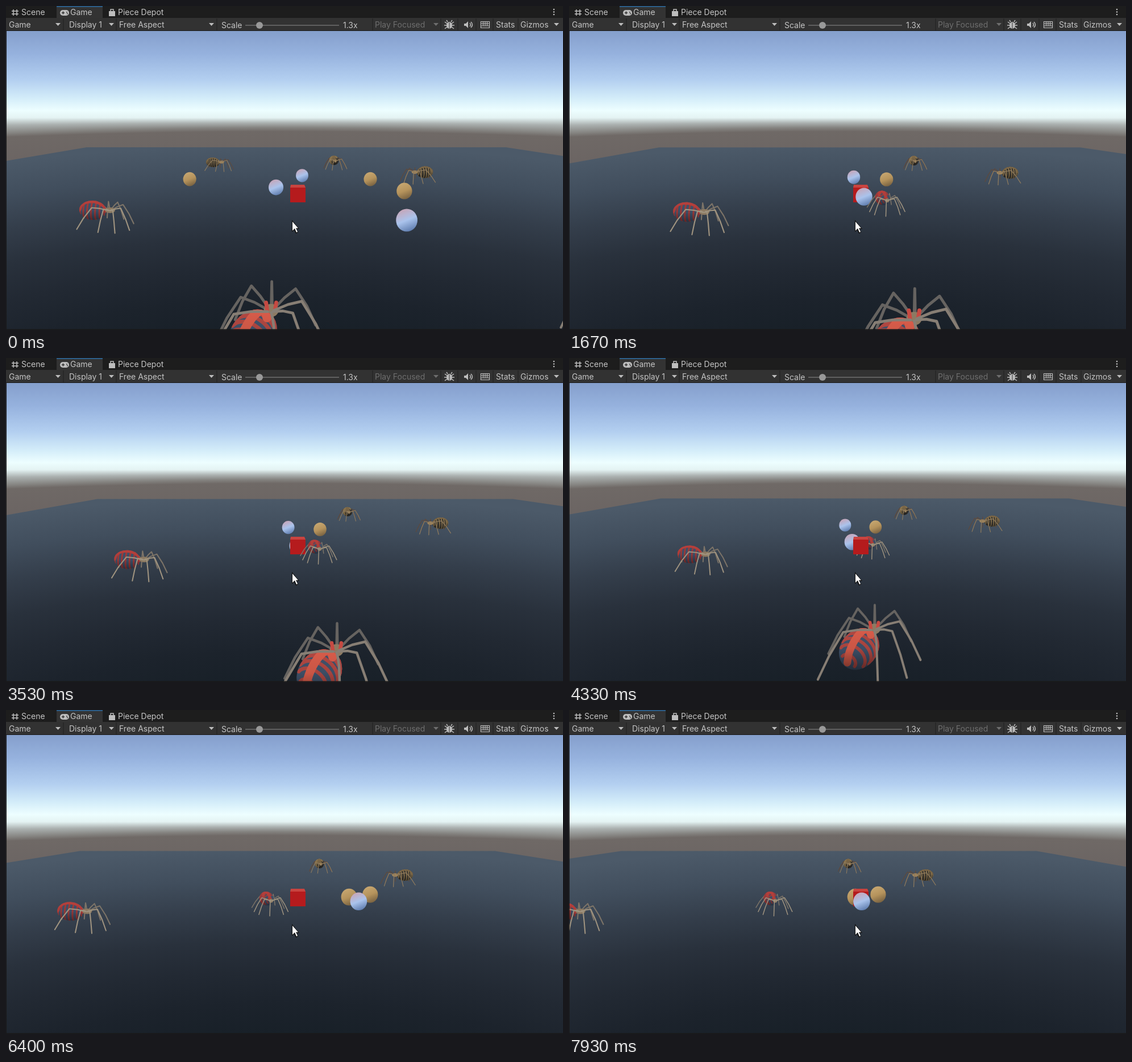
An HTML page with a canvas that plays this animation: 980 px wide and 571 px high, repeating every 8 s.

```html
<!DOCTYPE html>
<html lang="en">
<head>
<meta charset="utf-8">
<title>Spider arena</title>
<style>
  html, body { margin: 0; width: 100%; height: 100%; overflow: hidden; background: #191919; }
  canvas, svg { position: absolute; left: 0; top: 0; display: block; }
  text { font: 14px Inter, Roboto, sans-serif; fill: #c4c4c4; }
  .icon { fill: none; stroke: #bdbdbd; stroke-width: 1.5; }
  .solid { fill: #bdbdbd; }
  .dim { fill: #6e6e6e; }
</style>
</head>
<body>
<canvas id="view" width="980" height="571"></canvas>
<svg width="980" height="44" viewBox="0 0 980 44">
  <rect width="980" height="22" fill="#1d1d1d"/>
  <rect x="89" width="81" height="22" fill="#333"/>
  <rect x="89" width="81" height="2" fill="#2c5d87"/>
  <rect y="21" width="980" height="22" fill="#323232"/>
  <rect y="43" width="980" height="1" fill="#191919"/>
  <path d="M101 22v21M194 22v21M371 22v21M645 22v21M765 22v21M795 22v21M827 22v21M857 22v21M901 22v21" stroke="#202020"/>
  <path class="icon" d="M13 6v11M19 6v11M10 9h12M10 14h12"/>
  <rect class="solid" x="95" y="7" width="16" height="10" rx="5"/>
  <path d="M98 12h5M100.500 9.500v5M106 11h2M107 13.500h2" stroke="#333" stroke-width="1.500"/>
  <path class="solid" d="M181 9h11v9h-11z"/>
  <path class="icon" d="M184 9V6h5v3"/>
  <g class="solid">
    <circle cx="964" cy="6" r="1.300"/><circle cx="964" cy="10.500" r="1.300"/><circle cx="964" cy="15" r="1.300"/>
    <path d="M87 30h9l-4.500 5zM181 30h9l-4.500 5zM357 30h9l-4.500 5zM964 30h9l-4.500 5z"/>
    <ellipse cx="780" cy="34" rx="5" ry="6"/>
    <path d="M806 31h3l4-4v12l-4-4h-3z"/>
  </g>
  <path class="dim" d="M752 30h9l-4.500 5z"/>
  <path class="icon" d="M772 28l4 3M788 28l-4 3M771 34h18M772 40l4-3M788 40l-4-3M777 28l-2-3M783 28l2-3M816 30q3 3 0 6M818 28q5 5 0 10"/>
  <path d="M780 29v11" stroke="#323232"/>
  <path class="icon" style="stroke-width:1.2" d="M835.500 27.500h15v11h-15zM836 31h14M836 35h14M839.500 28v7M843 28v7M846.500 28v7"/>
  <path d="M421 34h165" stroke="#606060" stroke-width="2"/>
  <circle cx="446" cy="34" r="6" fill="#999"/>
  <text x="27" y="16">Scene</text><text x="113" y="16">Game</text><text x="197" y="16">Piece Depot</text>
  <text x="5" y="38">Game</text><text x="111" y="38">Display 1</text><text x="199" y="38">Free Aspect</text>
  <text x="379" y="39">Scale</text><text x="593" y="39">1.3x</text>
  <text x="649" y="38" style="fill:#6e6e6e">Play Focused</text>
  <text x="862" y="38">Stats</text><text x="905" y="38">Gizmos</text>
</svg>
<script>
const LOOP = 8000, MID = 490, HORIZON = 190;
const ctx = document.getElementById('view').getContext('2d');
const { sin, cos, sqrt, hypot, max, min, PI } = Math;
const mix = (a, b, k) => a + (b - a) * k;

// The camera slides over a flat floor: [seconds, sideways, forward].
const cameraPath = [[0, 0, 0], [1.67, -.305, .00009], [2.8, -.355, .00014],
  [4.33, -.18, -.00046], [5.6, -.077, -.00016], [8, .94, -.00016]];

function cameraAt(t) {
  const i = cameraPath.findIndex(key => key[0] > t);
  const a = cameraPath[i - 1], b = cameraPath[i], k = (t - a[0]) / (b[0] - a[0]);
  return { x: mix(a[1], b[1], k), z: mix(a[2], b[2], k) };
}

// near = pixels below the horizon when the camera stands at the origin.
function project(x, near, camera) {
  const v = 1 / (1 / near - camera.z);
  return { x: MID + (x - camera.x) * v, y: HORIZON + v, v };
}

const red = { base: '#40536c', band: '#a23c3b', ridge: '#b8403c', leg: '#a09480', head: '#8c7a62', far: '#7d7468' };
const tan = { base: '#393631', band: '#8f7850', ridge: '#7d6848', leg: '#8f7b5e', head: '#a3875c', far: '#5f4a3c' };
const nearRed = { ...red, band: '#b24842', ridge: '#d85c4a', leg: '#877e74', far: '#666360', fangs: true };

const always = { from: 0, to: 8 };
const spiders = [
  { ...always, look: tan, x: .926, near: 94, yaw: 1.4, size: 1 },
  { ...always, look: tan, x: 2.093, near: 118, yaw: 2.85, size: 1 },
  { ...always, look: red, x: -1.73, near: 195, yaw: .2, size: 1 },
  { from: 0, to: .9, look: tan, x: -1.286, near: 98, yaw: .2, size: 1 },
  { from: .9, to: 8, look: red, x: .066, near: 164, yaw: 1.2, size: .85 },
  { from: 0, to: 5.2, look: nearRed, x: -.125, near: 446, yaw: -1.1, size: 1 },
  { from: 0, to: .9, look: nearRed, x: 1.51, near: 370, yaw: -1.1, size: 1 }];

const blue = ['#c7a6b8', '#aac3ec', '#5d7bad'];
const sand = ['#c7a771', '#b5935c', '#766040'];
const volley = (from, to, homing, ...spots) =>
  spots.map(([colors, x, near]) => ({ from, to, homing, colors, x, near }));
const balls = [
  ...volley(0, .9, .9, [sand, -1.315, 127], [sand, 1.19, 127], [sand, 1.407, 150],
    [blue, -.105, 143], [blue, .258, 120], [blue, 1.04, 207]),
  ...volley(.9, 4.9, 0, [sand, .234, 126], [blue, -.216, 122], [blue, -.125, 159]),
  ...volley(4.9, 8, 0, [sand, 1, 158], [sand, 1.272, 153], [blue, 1.064, 167])];

function gradient(x0, y0, x1, y1, stops) {
  const g = ctx.createLinearGradient(x0, y0, x1, y1);
  stops.forEach((s, i) => Array.isArray(s) ? g.addColorStop(...s) : g.addColorStop(i / (stops.length - 1), s));
  return g;
}
function ellipse(x, y, rx, ry, color, rot = 0) {
  ctx.beginPath();
  ctx.ellipse(x, y, rx, ry, rot, 0, 2 * PI);
  ctx.fillStyle = color;
  ctx.fill();
}
function trace(points) {
  ctx.beginPath();
  points.forEach(p => ctx.lineTo(...p));
}
function polygon(color, ...points) {
  trace(points);
  ctx.fillStyle = color;
  ctx.fill();
}
function line(color, width, ...points) {
  trace(points);
  ctx.strokeStyle = color;
  ctx.lineWidth = width;
  ctx.stroke();
}

// Sky with a slightly curved horizon, painted once and kept.
const sky = document.createElement('canvas');
sky.width = 980;
sky.height = 300;
function paintSky() {
  const skyCtx = sky.getContext('2d');
  for (let x = 0; x < 980; x += 2) {
    const drop = 10 * ((x - MID) / MID) ** 2;
    const stops = [[44, '#859fcc'], [85, '#96b2de'], [130, '#b3cff0'], [162, '#d3ecf9'], [184, '#edfeff'],
      [197, '#e4f3f3'], [206 + drop * .4, '#abb1b0'], [214 + drop, '#858481'], [221 + drop, '#6f6966'], [300, '#696261']];
    skyCtx.fillStyle = gradient(0, 0, 0, 300, stops.map(([y, c]) => [y / 300, c]));
    skyCtx.fillRect(x, 0, 2, 300);
  }
}

const floorPaint = ctx.createRadialGradient(0, 0, 149, 0, 0, 475);
['#182028', '#1c232c', '#222933', '#29313c', '#343e4b', '#414e5d', '#4c5a69'].forEach(
  (c, i) => floorPaint.addColorStop(i / 6, c));

function drawFloor(camera) {
  const left = project(-5.9, 59, camera), right = project(6.6, 59, camera);
  const side = (corner, x) => HORIZON + corner.v * (x - MID) / (corner.x - MID);
  ctx.save();
  trace([[0, side(left, 0)], [left.x, left.y], [right.x, right.y], [980, side(right, 980)], [980, 571], [0, 571]]);
  ctx.clip();
  ctx.translate(MID, 720);
  ctx.scale(2.97, 1);
  ctx.fillStyle = floorPaint;
  ctx.fillRect(-170, -480, 340, 340);
  ctx.restore();
}

function drawAbdomen(look, yaw, tilt) {
  const LONG = 24, ROUND = 17;
  const axisX = cos(yaw), axisY = sin(yaw) * tilt;
  const length = hypot(axisX, axisY), across = sqrt(1 - length * length);
  const rx = hypot(LONG * length, ROUND * across);
  const angle = Math.atan2(axisY, axisX);
  ctx.save();
  ctx.rotate(angle);
  ellipse(0, 0, rx, ROUND, look.base);
  ctx.clip();
  const visible = yaw < 0 ? -PI / 2 : PI / 2;
  ctx.strokeStyle = look.band;
  ctx.lineWidth = 3;
  for (let p = -.9; p < 1; p += .3) {
    const r = ROUND * sqrt(1 - p * p);
    ctx.beginPath();
    ctx.ellipse(p * LONG * length, 0, r * across, r, 0, visible, visible + PI);
    ctx.stroke();
  }
  ctx.rotate(-angle);
  const ridge = [];
  for (let p = -1; p <= 1; p += .1) {
    ridge.push([p * LONG * axisX, p * LONG * axisY - ROUND * sqrt(max(0, 1 - p * p)) * sqrt(1 - tilt * tilt)]);
  }
  line(look.ridge, 7, ...ridge);
  ctx.fillStyle = gradient(0, -20, 0, 20, ['#0000', '#0001', '#0007']);
  ctx.fillRect(-30, -30, 60, 60);
  ctx.restore();
}

// Four leg pairs fan out from the thorax; each bends at a raised knee.
function legsOf(yaw, tilt) {
  const legs = [];
  const HEIGHT = 25, thoraxX = 31 * cos(yaw), thoraxZ = 31 * sin(yaw);
  for (const sign of [-1, 1]) {
    for (let i = 0; i < 4; i++) {
      const angle = yaw + sign * (.45 + .72 * i), reach = i === 3 ? 62 : 43;
      const joint = (part, lift) => [thoraxX + part * reach * cos(angle),
        HEIGHT - lift + tilt * (thoraxZ + part * reach * sin(angle))];
      legs.push({ depth: sin(angle), points: [joint(.05, 27), joint(.3, 32), joint(.55, 35), joint(.8, 18), joint(1, 0)] });
    }
  }
  return legs;
}

function drawSpider({ look, yaw, size }, { x, y, v }) {
  const scale = v / 195 * size, tilt = min(.6, v / 610);
  ctx.save();
  ctx.translate(x, y - 25 * scale);
  ctx.scale(scale, scale);
  ctx.lineCap = ctx.lineJoin = 'round';
  const legs = legsOf(yaw, tilt), width = max(2.1, 1.1 / scale);
  const drawLegs = (keep, color) => legs.filter(keep).forEach(leg => line(color, width, ...leg.points));
  const headX = 31 * cos(yaw), headY = 31 * sin(yaw) * tilt - 2;
  const drawHead = () => {
    ellipse(headX, headY, 3 + 6 * Math.abs(cos(yaw)), 5, look.head);
    if (look.fangs) {
      for (const side of [-3, 3]) line('#c64a42', 3, [headX + side, headY], [headX + side * 1.3, headY - 6]);
    }
  };
  drawLegs(leg => leg.depth < 0, look.far);
  if (yaw < 0) drawHead();
  drawAbdomen(look, yaw, tilt);
  if (yaw >= 0) drawHead();
  drawLegs(leg => leg.depth >= 0, look.leg);
  ctx.restore();
}

function drawBall({ colors }, { x, y, v }) {
  const r = v * .094;
  ellipse(x, y - r, r * .97, r * 1.03, gradient(x - r * .4, y - 2 * r, x + r * .4, y, colors));
}

function drawCube() {
  polygon('#c94440', [501, 315], [525, 315], [527, 320], [500, 320]);
  polygon('#b51b1d', [500, 320], [527, 320], [527, 346], [500, 346]);
}

function drawPointer() {
  polygon('#111', [503, 377], [503, 398], [507, 395], [510, 401], [514, 399], [511, 393], [516, 393]);
  polygon('#fff', [504, 380], [504, 396], [508, 392], [511, 399], [513, 398], [510, 391.5], [514, 391.5]);
}

function render(t) {
  const camera = cameraAt(t);
  const live = o => t >= o.from && t < o.to;
  const scene = [{ v: 156, draw: drawCube }];
  const place = (spot, draw, item) => scene.push({ v: spot.v, draw: () => draw(item, spot) });
  spiders.filter(live).forEach(s => place(project(s.x, s.near, camera), drawSpider, s));
  balls.filter(live).forEach(b => {
    const k = b.homing * (t - b.from) / (b.to - b.from);
    place(project(mix(b.x, .1, k), mix(b.near, 156, k), camera), drawBall, b);
  });
  ctx.drawImage(sky, 0, 0);
  drawFloor(camera);
  scene.sort((a, b) => a.v - b.v).forEach(o => o.draw());
  drawPointer();
  ctx.fillStyle = '#191919';
  ctx.fillRect(0, 44, 1, 527);
  ctx.fillRect(0, 569.5, 980, 1.5);
}

paintSky();
const start = performance.now();
function tick() {
  render(((performance.now() - start) % LOOP) / 1000);
  requestAnimationFrame(tick);
}
tick();
</script>
</body>
</html>
```
